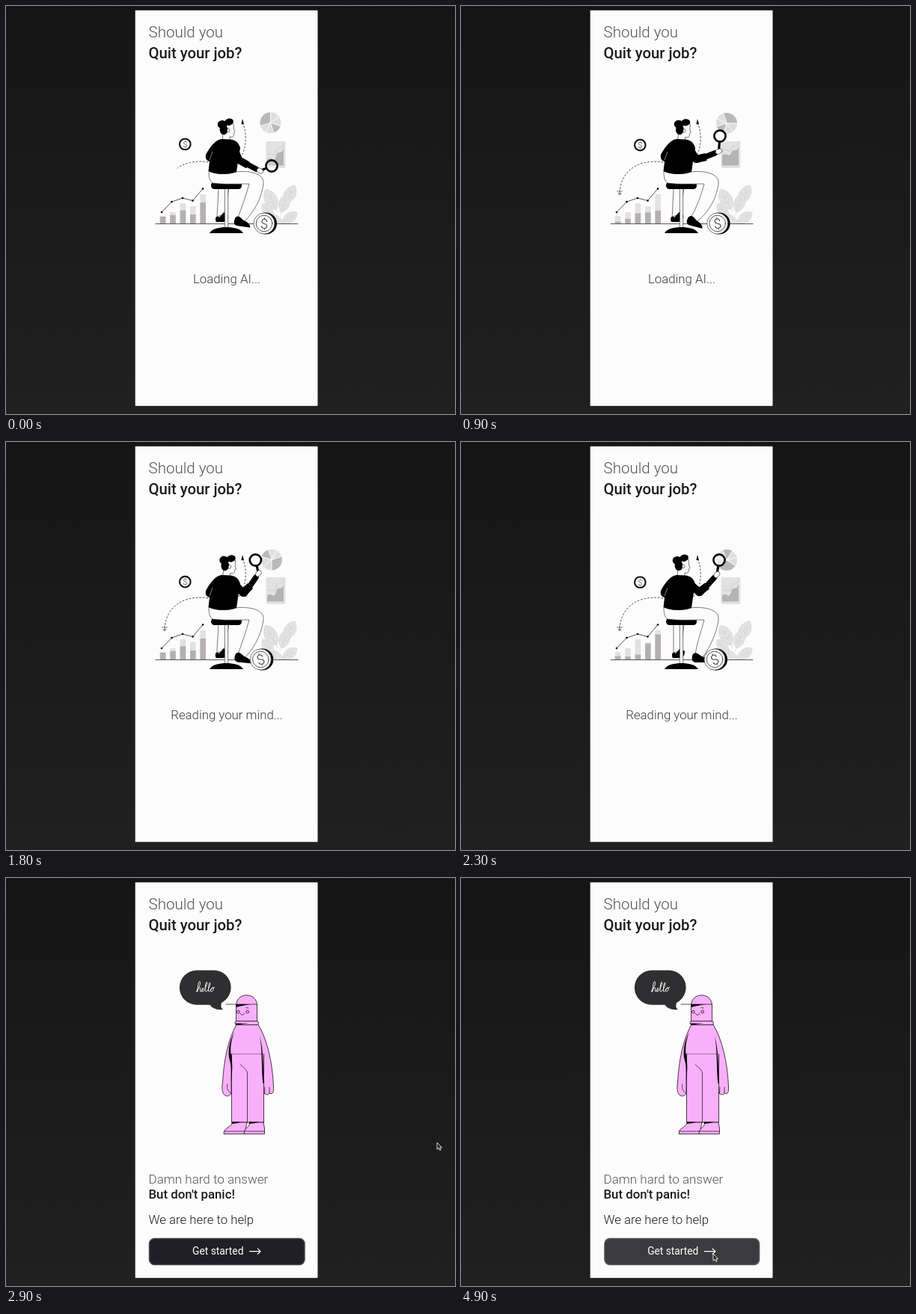
Write an HTML page that moves like this. It is 600 px wide and 546 px high and loops after 5 s.

```html
<!DOCTYPE html>
<html lang="en">
<head>
<meta charset="utf-8">
<title>Should you quit your job?</title>
<style>
  html, body { margin: 0; width: 100%; height: 100%; overflow: hidden; background: #1a1a1a; }
  svg { display: block; width: 100vw; height: 100vh; }
  text { font-family: Roboto, sans-serif; fill: #1c1c20; }
  .light { font-weight: 300; fill: #3c3c3c; }
  .medium { font-weight: 500; }
  .body { font-size: 16.8px; }
  .middle { text-anchor: middle; }
  .pale { fill: #555; }
  .ink { fill: none; stroke: #111; stroke-width: .7; stroke-linecap: round; stroke-linejoin: round; }
  .paper { fill: #fcfcfd; stroke: #222; stroke-width: .6; stroke-linejoin: round; }
  .dashed { fill: none; stroke: #222; stroke-width: .8; stroke-dasharray: 2.6 2; }
  .leaf { fill: #e3e3e3; stroke: #d2d2d2; stroke-width: .6; }
  .pink { fill: #f8b0fa; stroke: #1b101c; stroke-width: .8; stroke-linejoin: round; }
</style>
</head>
<body>
<svg viewBox="0 0 600 546">
  <defs>
    <linearGradient id="night" x2="0" y2="1">
      <stop stop-color="#151515"/><stop offset="1" stop-color="#202020"/>
    </linearGradient>
    <clipPath id="sheetClip"><rect x="348" y="181" width="25" height="33"/></clipPath>
  </defs>
  <rect width="600" height="546" fill="url(#night)"/>
  <rect x="172.7" y="5.8" width="243.8" height="529.4" fill="#fcfcfd"/>
  <text class="light pale" x="190.5" y="42" font-size="20.5">Should you</text>
  <text class="medium" x="190.5" y="69.5" font-size="20.3">Quit your job?</text>

  <g id="loading">
    <g id="plants"></g>
    <g id="pie">
      <circle r="14" fill="#dedede"/>
      <path d="M0 0V-14A14 14 0 0 0 -13.3 4.3ZM0 0L13.3 4.3A14 14 0 0 1 4.3 13.3Z" fill="#b9b9b9"/>
      <path d="M0 0V-14M0 0L-13.3 4.3M0 0L13.3 4.3M0 0L4.3 13.3M0 0L-6 12.6M0 0L11 -8.6" stroke="#fcfcfd"/>
    </g>
    <rect x="347.5" y="181" width="26" height="36" rx="2" fill="#e3e2e2"/>
    <path id="area" fill="#b6b3b3" clip-path="url(#sheetClip)"/>
    <path id="areaLine" fill="none" stroke="#cfcdcd" clip-path="url(#sheetClip)"/>

    <g id="bars"></g>
    <path class="ink" d="M208 276L221.5 262L236 257L249.5 260.5L263 244.5"/>
    <g id="dots"></g>

    <path id="trail" class="dashed"/>
    <path id="spark" class="dashed" d="M212 246V254M208.5 247.5L215.5 253M215.5 247.5L208.5 253"/>
    <path class="dashed" d="M311 207C322 192 322 172 317 158"/>
    <path d="M316 151L314.4 158L318 158.4Z"/>

    <g id="smallCoin">
      <circle r="7.3" fill="#fcfcfd" stroke="#111" stroke-width="2.1"/>
      <text class="light middle" y="3.8" font-size="10.5">$</text>
    </g>

    <path class="ink" d="M200 291.5H390"/>
    <path class="paper" id="backLeg"/>
    <path id="backShoe" d="M-7 1C-7 -3 -4 -3 -2 -1L4 -8L10 -4C10 1 8 5 3 5H-5C-7 5 -7 3 -7 1Z"/>
    <rect class="paper" x="292.3" y="243" width="4.4" height="55"/>
    <path d="M272 304C275 298 285 296 294.5 296S314 298 317 304Z"/>
    <rect x="274" y="235.5" width="41" height="9.5" rx="4.5"/>
    <path class="paper" id="frontLeg"/>
    <path id="frontShoe" d="M-10 -3C-10 -7 -6 -9 -3 -7L3 -3C8 -2 12 1 12 5H-6C-10 4 -11 1 -10 -3Z"/>
    <g id="coin">
      <circle cx="2.4" r="14.6"/>
      <circle class="paper" r="14"/>
      <circle class="ink" r="10.8" stroke-width=".6"/>
      <text id="dollar" class="light middle" y="6.7" font-size="18.5">$</text>
    </g>

    <g id="head">
      <path class="paper" d="M289 168L288 182L298 183L298 175C302 176 304 174 303.5 170L305 168L303.5 165L303 157L294 156Z"/>
      <ellipse cx="297" cy="155.3" rx="6" ry="4.6" transform="rotate(-15 297 155.3)"/>
      <ellipse cx="288" cy="158.5" rx="6.3" ry="5.6"/>
      <ellipse cx="290" cy="165.5" rx="5.4" ry="6.8"/>
      <ellipse class="paper" cx="296.2" cy="166.5" rx="1.8" ry="2.4"/>
    </g>
    <path d="M288 178C278 180 272 190 267 199C266 204 268 207 272 208L270.5 221C280 226 297 226 308 222L310 208L313 190C311 182 306 179 299 178.5Z"/>
    <path d="M276 195L272 206" stroke="#fff" stroke-width=".5"/>
    <path id="sleeve" fill="none" stroke="#000" stroke-width="10" stroke-linejoin="round"/>
    <path id="forearm" stroke="#000" stroke-width="7.5" stroke-linecap="round"/>
    <path id="handle" stroke="#000" stroke-width="3.2" stroke-linecap="round"/>
    <ellipse id="hand" class="paper" rx="4.6" ry="3.2"/>
    <circle id="lens" r="7.6" fill="#fff" fill-opacity=".3" stroke="#000" stroke-width="2.6"/>
    <text id="status" class="light body middle" x="295" y="371.3"></text>
  </g>

  <g id="hello">
    <path fill="#2f2e30" d="M255 123.5H278.5A23 23 0 0 1 288 167C287 171 287 174 290 176C281 177 275 174 272.5 169.8H255A23.1 23.1 0 0 1 255 123.5Z"/>
    <path aria-label="hello" fill="none" stroke="#fff" stroke-width=".9" stroke-linecap="round" d="M254 152C258 148 261 140 259 138.5C257 138 256.5 146 255.5 152.5C256.5 148 258.5 146 259.5 147C260.2 148 258.5 152 260 152C262 152 264 149 263.5 147.5C262.5 146.5 260.8 150 262 152C264 153 267.5 146 268.5 141C269 138 267 139 266.5 144C266 148 265.5 152 267 152C269.5 152 272 146 272.8 142C273 138.5 271.2 140 270.8 145C270.4 149 270 152.2 271.5 152C273.5 151 274 147 276.5 147C278 147.3 277 152 274.5 152C272.8 152 273.8 147 276 147L278.5 146.5"/>

    <path class="pink" d="M307.5 192V171C307.5 152 335.5 152 335.5 171V192Z"/>
    <path d="M307.5 169H328C322 169.5 315 171 307.5 173Z"/>
    <path class="ink" d="M294 169H335.5M313 181C314 184 318 184 319 181M321 173.5L324 174"/>
    <circle class="pink" cx="310.3" cy="179" r="1.8"/>
    <circle class="pink" cx="322.7" cy="179" r="1.8"/>
    <path class="pink" d="M308 196C297 216 291 243 289.5 274C288 282 289 289 293 291C296 293 300 291 301 288V236H344.5L343 275C340 281 341 288 345 288C348 291 351 290 352 288C357 290 358 286 357.5 279C356 246 349 216 337 196Z"/>
    <path class="pink" d="M301.5 236V327H344.5V236"/>
    <rect class="pink" x="306" y="191.5" width="31.5" height="5" rx="2.4"/>
    <path d="M307 194.5H325C319 195 312 196 307.5 197Z"/>
    <path d="M305 206C298 220 297 231 298 240C301 251 302 257 300.5 273C303 258 302.5 249 301.5 240C299 231 300 220 305 206ZM339 211C343 231 341 257 343.5 275L345 274C343 257 345 233 339 211Z"/>
    <path class="ink" d="M298 236H302M313 249.5C318 254 322.5 257 322.5 262V327M296 276C294 282 297 284 300 288M346 280L345.5 288M352 280V288"/>
    <path class="pink" d="M302 327C302 334 291 333 291 342.5H319L322 327Z"/>
    <path class="pink" d="M325 327C327 334 318 333 318 342.5H345.5V335L344 327Z"/>
    <path d="M302 326.5H314C310 328 306 328.5 302 329ZM325 326.5H338C334 328 329 328.5 325 329Z"/>
    <path class="ink" d="M291.5 339H345.5"/>

    <text class="light pale" x="190.5" y="409" font-size="17">Damn hard to answer</text>
    <text class="medium body" x="190.5" y="429.3">But don't panic!</text>
    <text class="body" x="190.5" y="463.3" style="font-weight:300">We are here to help</text>
    <g id="button">
      <rect id="buttonFace" x="191.5" y="482.5" width="207.5" height="35" rx="7" stroke="#47474c" stroke-width="1.5"/>
      <text x="249" y="504.3" font-size="13.8" style="fill:#fff">Get started</text>
      <path d="M325 499.7H340M336 495.7L340 499.7L336 503.7" fill="none" stroke="#fff" stroke-width="1.2"/>
    </g>
  </g>
  <path id="cursor" d="M0 0V9.2L2.2 7.2L3.6 10.4L5.1 9.7L3.8 6.7H6.5Z" fill="#222" stroke="#eee" stroke-width=".9"/>
</svg>
<script>
const el = id => document.getElementById(id);
const set = (id, attrs) => { for (const name in attrs) el(id).setAttribute(name, attrs[name]); };
const place = (id, x, y, angle = 0) => set(id, { transform: `translate(${x} ${y}) rotate(${angle})` });

// Keys are [time, ...values]; values are interpolated linearly.
function along(keys, t) {
  const next = keys.findIndex(key => key[0] > t);
  if (next < 0) return keys[keys.length - 1].slice(1);
  if (next === 0) return keys[0].slice(1);
  const a = keys[next - 1], b = keys[next];
  const f = (t - a[0]) / (b[0] - a[0]);
  return a.slice(1).map((v, i) => v + (b[i + 1] - v) * f);
}

// elbow x, y; wrist x, y; lens x, y
const armKeys = [
  [0, 313, 208, 334, 218, 355, 214],
  [500, 313, 207, 337, 209, 356, 196],
  [900, 316, 207, 339, 197, 346, 174],
  [1400, 318, 205, 331, 180, 324, 158],
  [2300, 320, 203, 338, 182, 345, 158]
];
// front foot x, tilt; back foot x
const footKeys = [[0, 315, 8, 287], [500, 311, 18, 289], [1400, 313, 10, 285], [2300, 319, 0, 289]];
const headTilt = [[500, 0], [1400, 11], [2300, 0]];
const areaKeys = [[0, 0], [500, 1], [1000, .2], [1400, 0]];
const cursorKeys = [
  [2900, 576, 354], [3100, 526, 372], [3200, 526, 372],
  [3800, 446, 449], [4400, 335, 505], [4600, 337, 503]
];
const barTops = [281, 276, 264, 268, 252];
const barPhases = [2, 2.8, 3.1, 0, .6];
const barX = i => 205.8 + i * 13.4;

const leaf = ([x, y, angle, size]) => `<g transform="translate(${x} ${y}) rotate(${angle}) scale(${size})">
  <path class="leaf" d="M0 0C-10 -7 -9 -20 0 -26C9 -20 10 -7 0 0ZM0 4V-22M0 -8L-5 -13M0 -8L5 -13M0 -14L-4 -19M0 -14L4 -19"/></g>`;
el('plants').innerHTML = '<path d="M338 291C341 276 362 270 372 291Z" fill="#e3e3e3"/>' + [
  [361, 272, -28, 1.15], [357, 283, -38, .9], [373, 264, 28, 1.05], [368, 276, 18, 1], [370, 290, 54, .9]
].map(leaf).join('');
el('bars').innerHTML = barTops.map((top, i) =>
  `<rect x="${barX(i)}" y="${top}" width="7.6" height="${291 - top}" fill="#e3e1e1"/>
   <rect id="bar${i}" x="${barX(i)}" width="7.6" fill="#b5b0b0"/>`).join('');
el('dots').innerHTML = [[208, 276], [221.5, 262], [236, 257], [249.5, 260.5], [263, 244.5]]
  .map(([x, y]) => `<circle cx="${x}" cy="${y}" r="1.3"/>`).join('');

// Cubic from the man's back to the ground, cut at the given fraction.
function partialTrail(fraction) {
  const [a, b, c, d] = [[270, 209], [236, 204], [213, 222], [212, 250]];
  const point = u => [0, 1].map(k =>
    (1 - u) ** 3 * a[k] + 3 * (1 - u) ** 2 * u * b[k] + 3 * (1 - u) * u * u * c[k] + u ** 3 * d[k]);
  return 'M' + Array.from({ length: 31 }, (_, i) => point(fraction * i / 30).map(v => v.toFixed(2))).join('L');
}

function drawLoading(t) {
  const s = t / 1000;
  place('pie', 353.5 + Math.min(s * 3, 1.5), 156.3 + s * .7, s * 100);
  place('smallCoin', 239.3, 185 + s * 1.2);

  const coinX = 345 - s * 2.6;
  place('coin', coinX, 291);
  set('dollar', { transform: `rotate(${(coinX - 345) * 4})` });

  barTops.forEach((top, i) => {
    const swing = Math.cos((s - .5) * Math.PI / .9 + barPhases[i]);
    const height = (291 - top) * (.58 + .34 * swing);
    set('bar' + i, { y: 291 - height, height });
  });

  const [rise] = along(areaKeys, t);
  const curve = `M349 ${206 - 17 * rise}C355 ${199 - 11 * rise} 357 ${212 - 23 * rise} 361 ${201 - 12 * rise}C363 ${191 - 3 * rise} 368 ${201 - 13 * rise} 371 ${190 - 2 * rise}`;
  set('area', { d: curve + 'V213.5H349Z' });
  set('areaLine', { d: curve, transform: 'translate(0 -6)' });

  set('trail', { d: partialTrail(Math.min(1, .5 + s * 1.25)) });
  el('spark').style.display = t >= 400 && (t < 1200 || t >= 1600) ? '' : 'none';

  const [footX, tilt, backX] = along(footKeys, t);
  place('frontShoe', footX, 290, tilt);
  place('backShoe', backX, 284);
  set('backLeg', { d: `M284 244L${backX - 5} 282L${backX + 5} 279L298 244` });
  set('frontLeg', { d: `M271 221C271 229 272 234 276 237C290 239 308 238 325 238C321 253 315 270 ${footX - 6} 285L${footX + 4} 288C334 273 342 254 344 238C346 223 322 220 307 222C296 226 282 225 271 221Z` });

  const [nod] = along(headTilt, t);
  set('head', { transform: `translate(1 0) rotate(${nod} 292 182)` });

  const [elbowX, elbowY, wristX, wristY, lensX, lensY] = along(armKeys, t);
  const dx = wristX - elbowX, dy = wristY - elbowY, reach = Math.hypot(dx, dy);
  const handX = wristX + dx / reach * 6, handY = wristY + dy / reach * 6;
  const gx = lensX - handX, gy = lensY - handY, grip = Math.hypot(gx, gy);
  set('sleeve', { d: `M304 188L${elbowX - 2} ${elbowY - 2}L${elbowX + dx * .5} ${elbowY + dy * .5}` });
  set('forearm', { d: `M${elbowX} ${elbowY - 1}L${wristX} ${wristY}` });
  place('hand', handX, handY, Math.atan2(dy, dx) * 180 / Math.PI);
  set('handle', { d: `M${handX} ${handY}L${lensX - gx / grip * 8} ${lensY - gy / grip * 8}` });
  place('lens', lensX, lensY);
  el('status').textContent = t < 1000 ? 'Loading AI...' : 'Reading your mind...';
}

function drawHello(t) {
  const pressed = t >= 4900;
  set('buttonFace', { fill: t >= 4200 ? '#3b3a3d' : '#1f1f25', stroke: pressed ? '#58575b' : '#47474c' });
  set('button', { transform: pressed ? 'translate(295.2 500) scale(.996) translate(-295.2 -500)' : '' });
  el('cursor').style.display = t >= 2900 ? '' : 'none';
  place('cursor', ...along(cursorKeys, t));
}

function frame(now) {
  const t = Math.floor(now % 5000 / 100) * 100;
  el('loading').style.opacity = along([[2300, 1], [2400, .5], [2500, .2], [2600, 0]], t)[0];
  el('hello').style.display = t >= 2400 ? '' : 'none';
  drawLoading(Math.min(t, 2600));
  drawHello(t);
  requestAnimationFrame(frame);
}
frame(0);
</script>
</body>
</html>
```
